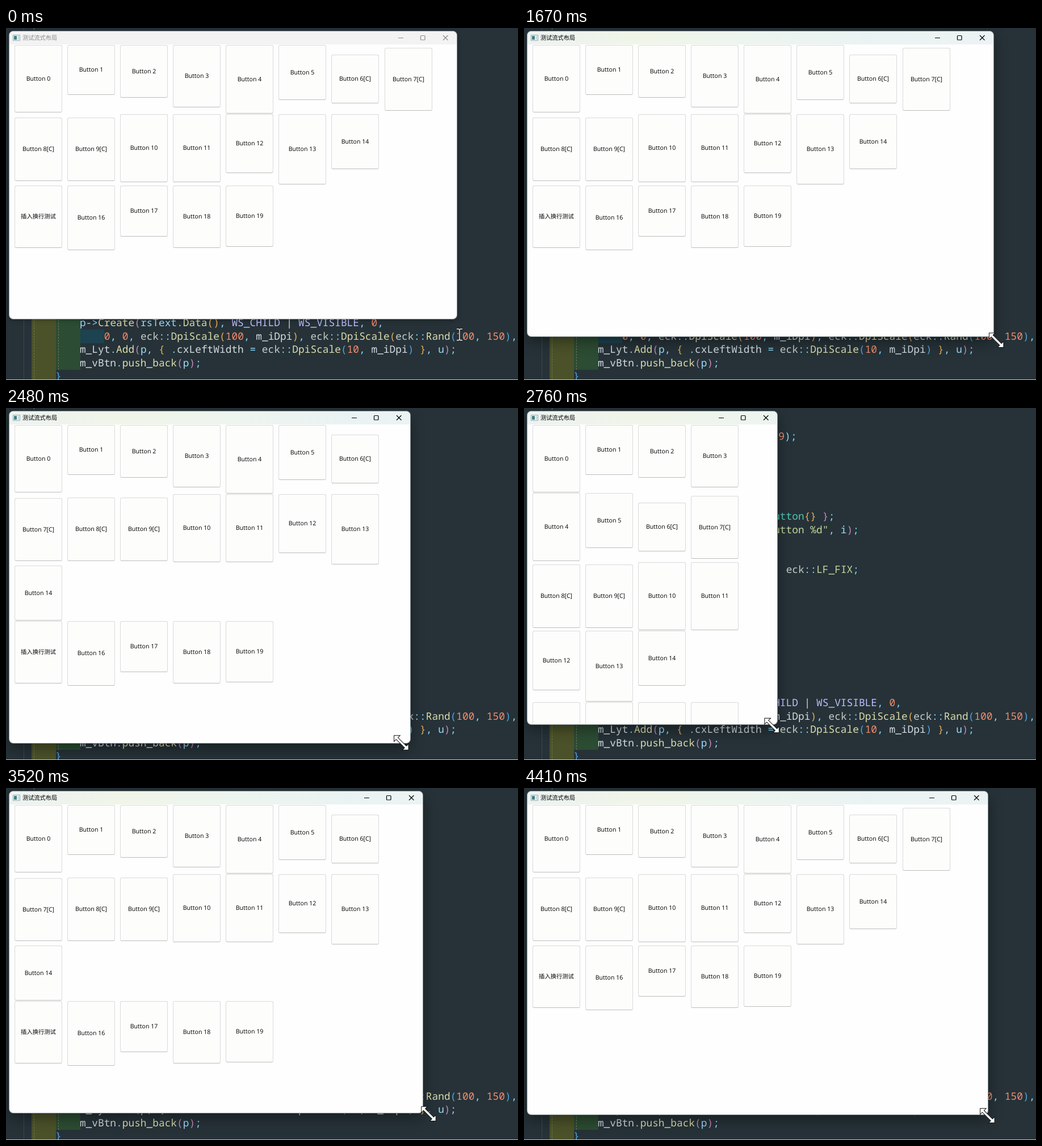
Recreate the animation shown at these times as an HTML page. Size 902 by 621 pixels, loop 4940 ms.

```html
<!DOCTYPE html>
<html lang="zh-CN">
<head>
<meta charset="utf-8">
<title>测试流式布局</title>
<style>
html, body { margin: 0; width: 100%; height: 100%; overflow: hidden; background: #263238; }
#stage { position: relative; width: 902px; height: 621px; overflow: hidden; background: #263238; }
#stage div, #stage svg { position: absolute; box-sizing: border-box; }
.line {
  font: 17.84px/24px "Noto Sans Mono", monospace;
  white-space: pre; text-rendering: geometricPrecision; font-variant-ligatures: none;
}
.guide { top: 0; width: 0; height: 621px; border-left: 1px dashed #6d7a5c; }
#edge { left: 0; bottom: 0; width: 100%; height: 1px; background: #c4c9cb; }
#win {
  left: 6px; top: 6px; overflow: hidden; border-radius: 7px; background: #fefefe;
  box-shadow: 0 0 0 1px #959da0, 0 2px 10px rgba(0, 0, 0, .3);
}
#win.active { box-shadow: 0 0 0 1px #8b9497, 0 10px 24px rgba(0, 0, 0, .38); }
#bar {
  left: 0; top: 0; width: 100%; height: 23px; background: #f3f3f3; color: #8b8b8b;
  font: 10.2px/22px "Noto Sans CJK SC", "Noto Sans CJK", sans-serif;
}
.active #bar {
  color: #000;
  background: linear-gradient(90deg, #ecf3f1, #f0f5e8 200px, #edf5ee 370px, #eaf3f3 600px, #edf3f4 902px);
}
#name { left: 23px; top: 0; white-space: nowrap; }
#icon { left: 6px; top: 6px; }
#caption { right: 0; top: 0; fill: none; stroke: currentColor; stroke-width: 1.2; }
.btn {
  display: flex; align-items: center; justify-content: center; width: 84px;
  border: 1px solid #dadada; border-bottom-color: #bdbdbd; border-radius: 3px;
  background: #fdfdfc; color: #000; white-space: nowrap;
  font: 10.6px/14px "Open Sans", "Noto Sans CJK SC", "Noto Sans CJK", sans-serif;
  text-rendering: geometricPrecision;
}
.btn.cjk { font-size: 10.3px; }
#cursor { left: 0; top: 0; }
</style>
</head>
<body>
<div id="stage">
  <div style="left:45px;top:100px;width:43px;height:521px;background:#4b5229"></div>
  <div style="left:88px;top:150px;width:43px;height:453px;background:#2c4c33"></div>
  <div style="left:131px;top:532px;width:42px;height:24px;background:#1d4250"></div>
  <div class="guide" style="left:31px;border-left:1px solid #3c474c"></div>
  <div class="guide" style="left:49px"></div>
  <div class="guide" style="left:92px;top:150px;height:453px"></div>
  <div id="code"></div>
  <div id="edge"></div>
  <div id="win">
    <div id="bar">
      <svg id="icon" width="14" height="11">
        <rect x=".5" y=".5" width="12" height="9.5" fill="#f4f8f8" stroke="#9aa5a8"/>
        <rect x="2" y="2" width="5" height="6.5" fill="#3f7f87"/>
        <rect x="8.5" y="2" width="2.5" height="6.5" fill="#c9d6d8"/>
      </svg>
      <div id="name">测试流式布局</div>
      <svg id="caption" width="120" height="23">
        <path d="M17 11.5h9"/>
        <rect x="56.5" y="7.5" width="7.5" height="7.5" rx="1"/>
        <path d="M96 7l8.5 8.5m0-8.500l-8.500 8.500"/>
      </svg>
    </div>
  </div>
  <svg id="cursor" width="902" height="621">
    <defs><path id="stem" d="M-5-10h3.500l1.500 1.500 1.500-1.500h3.500M0-8.500v17M-5 10h3.500l1.500-1.500 1.500 1.500h3.500"/></defs>
    <g id="beam" fill="none">
      <use href="#stem" stroke="#111" stroke-width="3"/>
      <use href="#stem" stroke="#eee" stroke-width="1.5"/>
    </g>
    <path id="sizer" fill="#fff" stroke="#111"
      d="M-18 0L-10.500-7.500V-2.200H10.500V-7.500L18 0 10.500 7.500V2.200H-10.500V7.500Z"/>
  </svg>
</div>
<script>
const $ = id => document.getElementById(id);
const add = (parent, cls, css) => {
  const el = document.createElement('div');
  el.className = cls;
  Object.assign(el.style, css);
  return parent.appendChild(el);
};

// Code behind the window: row, indent, tokens that each start with a colour key
const INK = {
  w: '#d3dbe0', c: '#89ddff', v: '#9cdcfe', f: '#dcdcaa', n: '#f78c6c', m: '#bebfff',
  p: '#c586c0', g: '#e5ac57', b: '#4fa3e0', t: '#4ec9b0', s: '#c3d69b', e: '#c5cdc9'
};
const LINES = [
  [0, 33.7, 'n9·c);'],
  [6, 4, 'eeck·c::·tCButton·c* ·vp ·p{ ·mnew ·eeck·c::·tCButton·g{}·p }·c;'],
  [7, 4, 'mauto ·vrsText ·c= ·eeck·c::·fFormat·p(·sL"Button %d"·c, ·vi·p)·c;'],
  [10, 8, 'vu ·c= ·eeck·c::·sLF_ALIGN_CENTER·w | ·eeck·c::·sLF_FIX·c;'],
  [20, 4, 'vp·c->·fCreate·p(·vrsText·c.·fData·g()·c, ·mWS_CHILD·w | ·mWS_VISIBLE·c, ·n0·c,'],
  [21, 8, 'n0·c, ·n0·c, ·eeck·c::·fDpiScale·g(·n100·c, ·wm_iDpi·g)·c, ·eeck·c::·fDpiScale·g(·eeck·c::·fRand·b(·n100·c, ·n150·b)·c,'],
  [22, 4, 'wm_Lyt·c.·fAdd·p(·vp·c, ·g{ ·c.·wcxLeftWidth·c = ·eeck·c::·fDpiScale·b(·n10·c, ·wm_iDpi·b)·g }·c, ·vu·p)·c;'],
  [23, 4, 'wm_vBtn·c.·fpush_back·p(·vp·p)·c;'],
  [24, 0, 'b}']
];
for (const [row, indent, text] of LINES) {
  const line = add($('code'), 'line', { left: 87 + indent * 10.72 + 'px', top: 38 + row * 23.5 + 'px' });
  for (const token of text.split('·')) {
    const span = document.createElement('span');
    span.style.color = INK[token[0]];
    span.textContent = token.slice(1);
    line.append(span);
  }
}

// Flow layout: left-to-right rows, [C] buttons centred in their row, a forced break before one
const HEIGHTS = [118.5, 87.5, 92.5, 109.5, 120.5, 97, 86, 111, 112, 112.5, 120.5, 120.5, 104.5, 124.5, 97, 110.5, 114, 90, 110.5, 108.5];
const BREAK = 15, PITCH = 93.1, WIDTH = 84, GAP = 1.2;
const isCentred = i => i >= 6 && i <= 9;
const buttons = HEIGHTS.map((h, i) => {
  const el = add($('win'), i === BREAK ? 'btn cjk' : 'btn');
  el.textContent = i === BREAK ? '插入换行测试' : 'Button ' + i + (isCentred(i) ? '[C]' : '');
  return el;
});

function layout(right) {
  const cols = Math.floor((right - 15 - WIDTH) / PITCH) + 1;
  let y = 24.2;
  for (let i = 0; i < HEIGHTS.length;) {
    const end = Math.min(i + cols, i < BREAK ? BREAK : HEIGHTS.length);
    const tall = Math.max(...HEIGHTS.slice(i, end));
    for (let c = 0; i < end; i++, c++) {
      const top = y + (isCentred(i) ? (tall - HEIGHTS[i]) / 2 : 0);
      const css = buttons[i].style;
      css.left = Math.round(8.9 + c * PITCH) + 'px';
      css.top = Math.round(top) + 'px';
      css.height = Math.round(top + HEIGHTS[i]) - Math.round(top) + 'px';
    }
    y += tall + GAP;
  }
}

// Turning points of the dragged corner (time, value), joined by cosine easing
const RIGHT = [[1440, 794], [2000, 923], [2130, 923], [2915, 390], [3871, 879], [4400, 816]];
const BOTTOM = [[1440, 513], [2000, 634], [2130, 634], [2760, 558], [3500, 573], [3800, 566], [4400, 576]];
function glide(keys, t) {
  const i = keys.findIndex(k => k[0] > t);
  if (i < 1) return keys.at(i)[1];
  const [[t0, a], [t1, b]] = keys.slice(i - 1, i + 1);
  return a + (b - a) * (1 - Math.cos(Math.PI * (t - t0) / (t1 - t0))) / 2;
}

const STEP = 70, PHASE = 20, LOOP = 4940, PRESS = 1450, RELEASE = 4400, LEAD = 15;

// Cursor kind, x, y, angle: rises from the text, meets the border, then leads the corner
function pointer(t) {
  if (t < 420) return ['beam', 799 - t / 140, 541 - t * .053, 0];
  if (t < 560) return ['sizer', 796, 517, 45];
  if (t < 1120) return ['sizer', 795, 511.5, 0];
  return ['sizer', glide(RIGHT, t + LEAD), glide(BOTTOM, t + LEAD) + 2, 45];
}

function draw(time) {
  const t = Math.max(0, Math.floor((time - PHASE) / STEP) * STEP + PHASE);
  const right = Math.round(glide(RIGHT, t));
  const bottom = Math.round(glide(BOTTOM, t));
  const win = $('win');
  win.style.width = right - 6 + 'px';
  win.style.height = bottom - 6 + 'px';
  win.classList.toggle('active', t >= PRESS);
  layout(right);

  const [kind, x, y, angle] = pointer(t);
  for (const id of ['beam', 'sizer']) {
    $(id).style.display = id === kind && t < RELEASE ? '' : 'none';
  }
  $(kind).setAttribute('transform', `translate(${x} ${y}) rotate(${angle})`);
}

const begin = performance.now();
function frame() {
  draw((performance.now() - begin) % LOOP);
  requestAnimationFrame(frame);
}
frame();
</script>
</body>
</html>
```
